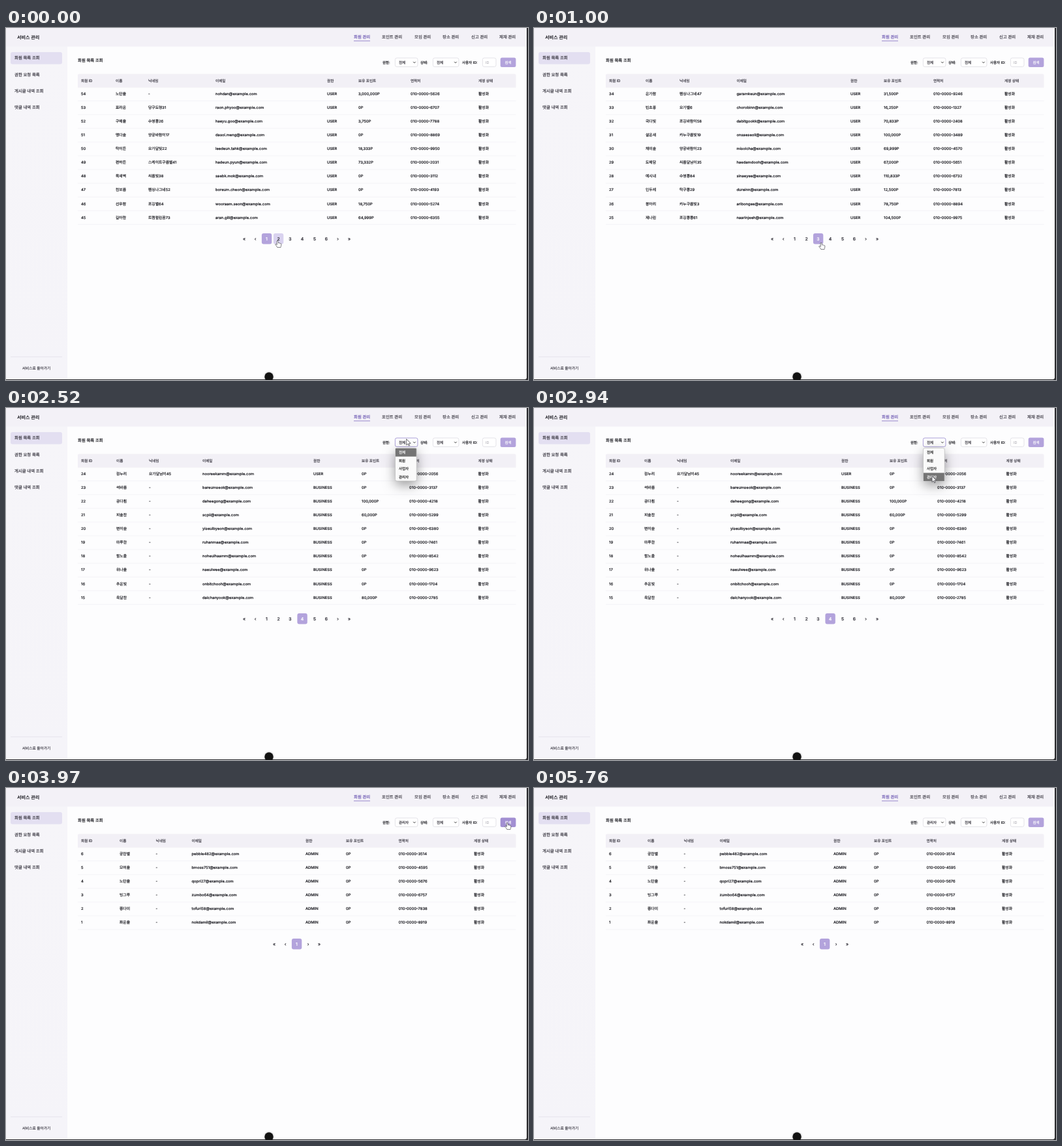
Write an HTML page with a canvas that moves like this. It is 800x540 px and loops after 5790 ms.

```html
<!DOCTYPE html>
<html lang="ko">
<head>
<meta charset="utf-8">
<style>
  html, body { margin: 0; width: 100%; height: 100%; overflow: hidden; background: #fff; }
  canvas { display: block; width: 800px; height: 540px; }
</style>
</head>
<body>
<canvas id="stage" width="800" height="540"></canvas>
<script>
const ctx = document.getElementById('stage').getContext('2d');
const LOOP = 5790;
const FONT = 'Inter, "Noto Sans CJK KR", "Noto Sans CJK", sans-serif';
const PURPLE = '#b3a3dc', HOVER = '#d9d2ef', INK = '#1c1c22';

// Moments at which the interface switches state
const PAGE_TIMES = [0, 150, 700, 1300, 3850];
const MENU_OPEN = 2400, MENU_PICK = 3000;

// Each row: name|nickname|mail user|points
const PAGES = [
  { first: 54, cols: [115, 168, 218, 321, 492, 540, 620, 724], rows: [
    '노단율|-|nohdan|3,000,000', '표라온|당구도령31|raon.phyoo|0',
    '구해율|수영콩26|haeyu.goo|3,750', '맹다솔|양궁바람이17|dasol.meng|0',
    '탁이든|요가달빛22|leedeun.tahk|18,333', '편하든|스케이트구름별41|hadeun.pyun|73,332',
    '목새벽|씨름빛38|saebk.mok|0', '천보름|펜싱나그네52|boreum.cheon|0',
    '선우람|조깅별64|wooraam.seon|18,750', '길아란|트램펄린꿈73|aran.gill|64,999'] },
  { first: 44, cols: [115, 170, 221, 315, 488, 538, 616, 722], rows: [
    '복다온|카누소년12|daon.bokk|25,000', '옥미르|탁구구름8|mireu.ok|0',
    '간이랑|요가콩33|irang.kan|41,250', '진솔비|당구달님이15|solbijinn|12,500',
    '어진결|수영별72|jingyeoleo|0', '형가온|양궁달빛48|gaonhyung|83,333',
    '태보리|조깅바람7|boritae|37,500', '승아롬|펜싱콩콩56|aromseung|0',
    '초하늬|씨름구름이24|hanuicho|66,000', '반여름|카누별91|yeoreumban|20,000'] },
  { first: 34, cols: [115, 171, 223, 310.5, 485, 536, 612, 721], rows: [
    '은가람|펜싱나그네47|garamkeun|31,500', '빈초롱|요가별6|chorobinn|16,250',
    '국다빛|조깅바람이58|dabitgookk|70,833', '설온새|카누구름빛19|onsaeseoll|100,000',
    '채미솔|양궁바람이23|misolcha|69,999', '도해담|씨름달님이35|haedamdooh|67,000',
    '예시내|수영콩84|sinaeyee|110,833', '인두레|탁구콩29|dureinn|12,500',
    '봉아리|카누구름빛3|aribongee|78,750', '제나린|조깅콩콩61|naarinjeeh|104,500'] },
  { first: 24, cols: [115, 169, 219, 301, 471, 545, 618, 723.5], rows: [
    '감누리|요가달님이45|nooreekamm|0', '석바름|-|bareumseok|0',
    '공다흰|-|daheegong|100,000', '피솔찬|-|scpii|60,000',
    '변이슬|-|yiseulbyeon|0', '마루한|-|ruhanmaa|0',
    '함노을|-|noheulhaamm|0', '위나울|-|naeulwee|0',
    '추온빛|-|onbitchooh|0', '육달찬|-|dalchanyook|80,000'] },
  { first: 6, cols: [115, 174, 229.5, 284.5, 459, 521, 601.5, 717], rows: [
    '궁한별|-|pebble482|0', '모여울|-|bmoss751|0', '노단율|-|qopri27|0',
    '빙그루|-|zumbo64|0', '종다미|-|tofuri58|0', '좌온율|-|nokdamil|0'] }
];
const HEADINGS = ['회원 ID', '이름', '닉네임', '이메일', '권한', '보유 포인트', '연락처', '계정 상태'];
const ROLES = ['전체', '회원', '사업자', '관리자'];

// Pointer stops: time, x, y
const POINTER = [
  [0, 416, 326], [250, 417, 326.5], [550, 436, 327], [850, 437, 327],
  [1000, 440, 329], [1230, 452, 327], [1500, 454, 326], [1880, 585.5, 122.5],
  [2250, 612, 49], [2520, 613.7, 47.6], [2850, 610, 104], [3050, 610, 105],
  [3360, 741.5, 58.8], [3500, 768, 53], [4500, 768, 53], [4670, 558, -10],
  [4700, 550, -30], [LOOP, 550, -30]
];
const ARROW = new Path2D('M0 0 L0 9.2 L2.1 7.3 L3.6 10.4 L5 9.8 L3.6 6.8 L6.5 6.6 Z');
const HAND = new Path2D('M-1 1 Q0 -.6 1 1 L1.4 4 Q2.3 3.2 3 4.2 Q4 3.6 4.5 4.6 ' +
  'Q5.8 4.2 5.9 5.8 L5.6 8.4 Q5.2 9.4 5 10.6 L-.2 10.6 Q-.6 9.4 -2.4 7.4 L-3.3 5.9 Q-2.6 4.6 -.6 6.4 Z');

function pointerAt(t) {
  const i = POINTER.findIndex((stop, n) => n > 0 && t <= stop[0]);
  const [t0, x0, y0] = POINTER[i - 1], [t1, x1, y1] = POINTER[i];
  const u = (t - t0) / (t1 - t0), k = u * u * (3 - 2 * u);
  return { x: x0 + (x1 - x0) * k, y: y0 + (y1 - y0) * k };
}

// A hairline stroke gives the regular Hangul glyphs a medium weight.
function text(str, x, y, size, color = INK, weight = 500, align = 'left') {
  ctx.font = `${weight} ${size}px ${FONT}`;
  ctx.textRendering = 'geometricPrecision';
  ctx.fillStyle = ctx.strokeStyle = color;
  ctx.lineWidth = size * 0.03;
  ctx.textAlign = align;
  ctx.fillText(str, x, y + size * 0.36);
  if (weight === 500) ctx.strokeText(str, x, y + size * 0.36);
}

function box(x, y, w, h, r, fill, stroke) {
  ctx.beginPath();
  ctx.roundRect(x, y, w, h, r);
  if (fill) { ctx.fillStyle = fill; ctx.fill(); }
  if (stroke) { ctx.strokeStyle = stroke; ctx.lineWidth = 0.7; ctx.stroke(); }
}

function rect(x, y, w, h, fill) {
  ctx.fillStyle = fill;
  ctx.fillRect(x, y, w, h);
}

const inside = (p, x, y, w, h) => p.x >= x && p.x <= x + w && p.y >= y && p.y <= y + h;

function drawFrame() {
  rect(0, 0, 800, 540, '#2b2b2e');
  box(0, 0, 798, 539, [0, 0, 3, 3], '#fdfdfe');
  const side = ctx.createLinearGradient(0, 28, 0, 539);
  side.addColorStop(0, '#f6f5f9');
  side.addColorStop(1, '#f5f4f9');
  rect(0, 28, 94, 511, side);
  rect(0, 0, 798, 28.5, '#f3f1f7');

  text('서비스 관리', 17, 14, 7.1, INK, 700);
  const nav = [['회원 관리', 533], ['포인트 관리', 576], ['모임 관리', 626],
    ['장소 관리', 669], ['신고 관리', 713], ['제재 관리', 756]];
  nav.forEach(([label, x], i) => text(label, x, 14, 6.4, i ? '#45434d' : '#7460b6'));
  rect(533, 19.4, 25, 0.9, '#8f7cc8');

  box(7, 37, 79, 18.5, 3, '#e3dff1');
  ['회원 목록 조회', '권한 요청 목록', '게시글 내역 조회', '댓글 내역 조회']
    .forEach((label, i) => text(label, 13, 46 + i * 25.3, 6.4, '#3c3a44'));
  rect(7, 504, 79, 0.8, '#e4e2ea');
  text('서비스로 돌아가기', 46.5, 521.5, 5.7, '#45434d', 500, 'center');
}

function select(x, w, label, focused) {
  box(x + 0.4, 46, w, 13.4, 2.5, '#fff', focused ? '#8877c8' : '#d9d7df');
  text(label, x + 6, 52.7, 5.5, '#33313a');
  ctx.beginPath();
  ctx.moveTo(x + w - 6.4, 51.8);
  ctx.lineTo(x + w - 4.6, 53.6);
  ctx.lineTo(x + w - 2.8, 51.8);
  ctx.strokeStyle = '#222';
  ctx.lineWidth = 0.9;
  ctx.stroke();
}

function drawFilters(t, pointer) {
  text('회원 목록 조회', 110, 50, 6.4);
  text('권한:', 577, 52.7, 5.5);
  select(596, 34.5, t >= MENU_PICK ? '관리자' : '전체', t >= MENU_OPEN && t < PAGE_TIMES[4]);
  text('상태:', 635, 52.7, 5.5);
  select(654, 39.5, '전체', false);
  text('사용자 ID:', 699, 52.7, 5.5);
  box(730.4, 46, 20.6, 13.4, 2.5, '#fff', '#d9d7df');
  text('ID', 735, 52.7, 5.5, '#a3a1aa', 400);
  box(757.7, 45.6, 23.7, 14.4, 2.5, inside(pointer, 758, 45, 24, 15) ? '#a28fd2' : PURPLE);
  text('검색', 769.6, 52.7, 5.5, '#fff', 500, 'center');
}

function drawTable(page, pointer) {
  box(110, 70.5, 671.5, 21, [2, 2, 0, 0], '#f2f0f6');
  HEADINGS.forEach((label, i) => text(label, page.cols[i], 81, 5.6, '#3c3a44'));
  page.rows.forEach((row, i) => {
    const id = page.first - i, y = 101.2 + i * 21.03;
    const [name, nick, user, points] = row.split('|');
    const role = id <= 6 ? 'ADMIN' : id <= 23 ? 'BUSINESS' : 'USER';
    const phone = `010-0000-${1000 + (id * 7919) % 9000}`;
    [id, name, nick, `${user}@example.com`, role, `${points}P`, phone, '활성화']
      .forEach((value, c) => text(String(value), page.cols[c], y, 5.8));
    rect(110, y + 10.4, 671.5, 0.6, '#ecebf0');
  });
  drawPager(page, pointer);
}

function drawPager(page, pointer) {
  const current = PAGES.indexOf(page), single = current === 4;
  const y = single ? 239.2 : 323.2;
  const numbers = single ? [445.5] : [399.5, 417.5, 435.5, 454, 473, 491];
  const ends = single ? [411, 428, 463, 480] : [365, 382, 508.5, 526];
  ['«', '‹', '›', '»'].forEach((mark, i) => text(mark, ends[i], y, 6.8, '#33313a', 500, 'center'));
  numbers.forEach((x, i) => {
    const active = single || i === current;
    const hovered = inside(pointer, x - 8, y - 8, 16, 16.5);
    if (active || hovered) box(x - 7.6, y - 8.2, 15.4, 16.5, 3, active ? PURPLE : HOVER);
    text(String(i + 1), x, y, 6.8, active ? '#fff' : '#33313a', 500, 'center');
  });
}

function drawMenu(pointer) {
  ctx.save();
  ctx.shadowColor = 'rgba(0,0,0,.4)';
  ctx.shadowBlur = 18;
  ctx.shadowOffsetY = 6;
  box(596.5, 61.5, 32.8, 50.5, 2.5, '#fafafa');
  ctx.restore();
  box(596.5, 61.5, 32.8, 50.5, 2.5, null, '#bbb');
  const hot = Math.max(0, Math.min(3, Math.floor((pointer.y - 62) / 12.5)));
  rect(597, 62 + hot * 12.5, 31.8, 12.5, '#747474');
  ROLES.forEach((label, i) => text(label, 602, 68.4 + i * 12.5, 5.5, i === hot ? '#fff' : '#222'));
}

function drawPointer(t, p) {
  const hand = t < 1560 || inside(p, 758, 45, 24, 15);
  ctx.save();
  ctx.translate(p.x, p.y);
  ctx.lineJoin = 'round';
  ctx.fillStyle = '#fff';
  ctx.strokeStyle = '#55555c';
  ctx.lineWidth = hand ? 0.75 : 0.9;
  const shape = hand ? HAND : ARROW;
  ctx.fill(shape);
  ctx.stroke(shape);
  ctx.restore();
}

function drawBadge() {
  ctx.save();
  ctx.shadowColor = 'rgba(0,0,0,.35)';
  ctx.shadowBlur = 3;
  ctx.beginPath();
  ctx.arc(403, 535, 6.7, 0, Math.PI * 2);
  ctx.fillStyle = '#121212';
  ctx.fill();
  ctx.restore();
}

function render(t) {
  const pointer = pointerAt(t);
  const page = PAGES[PAGE_TIMES.filter(start => t >= start).length - 1];
  drawFrame();
  drawFilters(t, pointer);
  drawTable(page, pointer);
  if (t >= MENU_OPEN && t < MENU_PICK) drawMenu(pointer);
  drawBadge();
  drawPointer(t, pointer);
}

const start = performance.now();
function tick() {
  render((performance.now() - start) % LOOP);
  requestAnimationFrame(tick);
}
tick();
</script>
</body>
</html>
```
